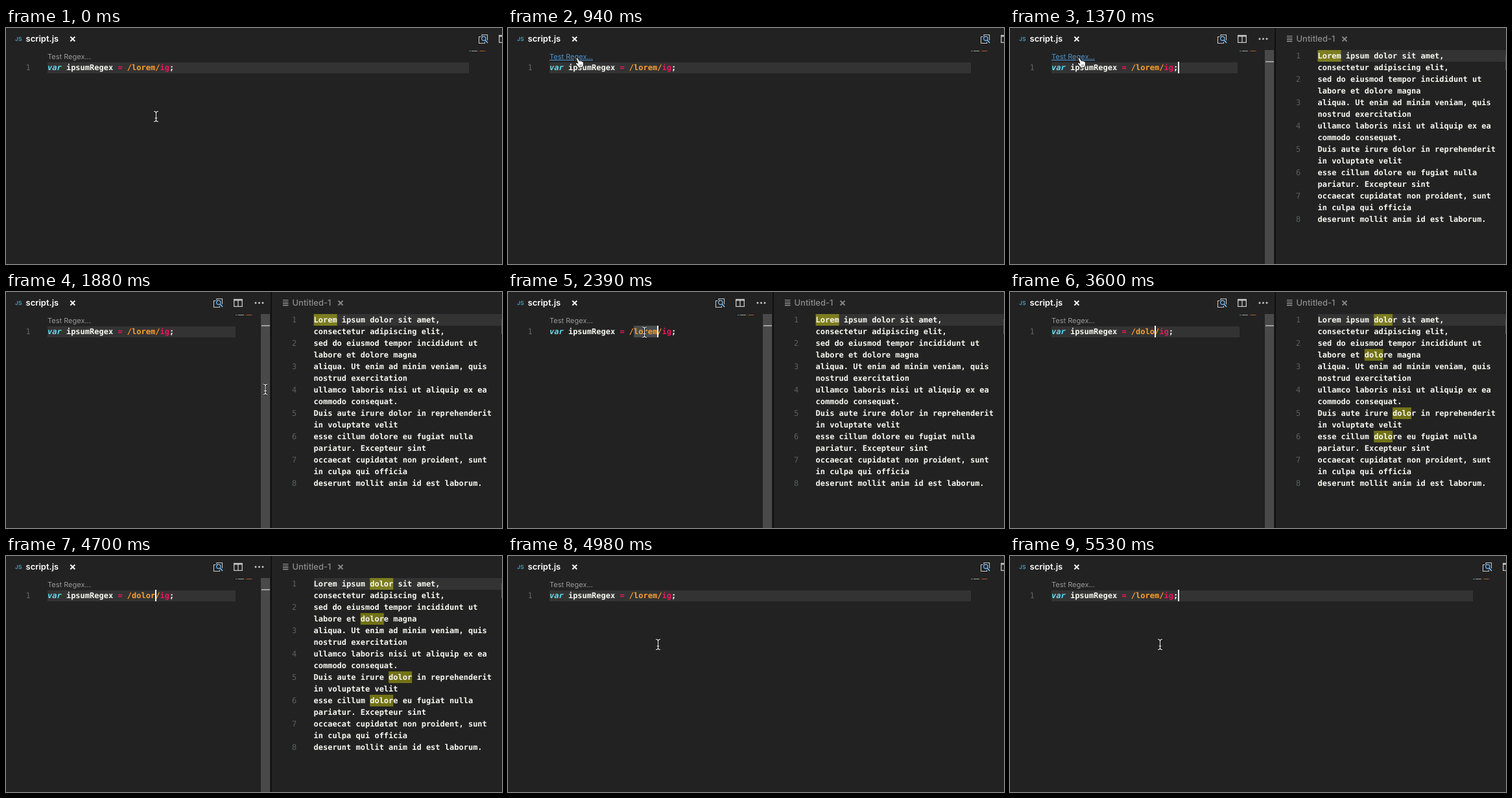
An HTML page that plays this animation: 765 by 364 pixels, repeating every 5650 ms.

```html
<!DOCTYPE html>
<html lang="en">
<head>
<meta charset="utf-8">
<title>Regex preview</title>
<style>
  html, body { margin: 0; width: 100%; height: 100%; overflow: hidden; background: #222; }
  svg { display: block; }
  text { white-space: pre; font: 500 13px Inter, "Open Sans", sans-serif; text-rendering: geometricPrecision; }
  .mono { font: 12px "DejaVu Sans Mono", monospace; }
  .bold { font-weight: bold; fill: #f8f8f2; }
  .title { font-weight: 600; fill: #fff; }
  .lens { font-size: 11px; font-weight: 400; }
  .badge { font-size: 8.5px; font-weight: 600; fill: #519aba; }
</style>
</head>
<body>
<svg id="stage" width="765" height="364" viewBox="0 0 765 364"></svg>
<script>
const LOOP = 5650, CHAR = 7.224, ROW = 18;
const CODE_X = 64, DOC_X = 474.5;
const PINK = '#f0155f', ORANGE = '#fd9f2b', CYAN = '#66d9ef';
const SPLIT = 1370, CLOSE = 4980, SELECT = 2270, TYPE = 3090;

const rows = [
  'Lorem ipsum dolor sit amet,', 'consectetur adipiscing elit,',
  'sed do eiusmod tempor incididunt ut', 'labore et dolore magna',
  'aliqua. Ut enim ad minim veniam, quis', 'nostrud exercitation',
  'ullamco laboris nisi ut aliquip ex ea', 'commodo consequat.',
  'Duis aute irure dolor in reprehenderit', 'in voluptate velit',
  'esse cillum dolore eu fugiat nulla', 'pariatur. Excepteur sint',
  'occaecat cupidatat non proident, sunt', 'in culpa qui officia',
  'deserunt mollit anim id est laborum.'
];

// Each track lists [start time, ...values]; values hold until the next entry.
const pattern = [[0, 'lorem'], [TYPE, 'd'], [3330, 'do'], [3480, 'dol'],
  [3600, 'dolo'], [3750, 'dolor'], [CLOSE, 'lorem']];
const matched = pattern.map(([t, word]) => [t === TYPE ? 3210 : t, word]);
const caretOn = [[0, 0], [270, 1], [820, 0], [SPLIT, 1], [1880, 0], [SELECT, 1],
  [2810, 0], [TYPE, 1], [4150, 0], [4700, 1], [CLOSE, 0], [5530, 1]];
const pointer = [[0, 'beam', 231.5, 136.5], [580, 'beam', 214, 122], [700, 'beam', 170, 92],
  [820, 'beam', 128, 62], [940, 'hand', 110, 53], [1490, 'beam', 250, 120],
  [1610, 'beam', 480, 210], [1730, 'beam', 640, 262], [1880, 'beam', 400, 150],
  [2000, 'beam', 210.5, 62], [2660, 'beam', 201, 62.5], [TYPE, ''],
  [CLOSE, 'beam', 231.5, 136.5]];

const at = (track, t) => track.filter(step => step[0] <= t).pop().slice(1);
const rect = (x, y, w, h, fill) =>
  `<rect x="${x}" y="${y}" width="${w}" height="${h}" fill="${fill}"/>`;
const line = (d, color, width = 1) =>
  `<path d="${d}" fill="none" stroke="${color}" stroke-width="${width}"/>`;
const text = (x, y, body, attrs = '') => `<text x="${x}" y="${y}" ${attrs}>${body}</text>`;
const span = (body, fill, attrs = '') => `<tspan fill="${fill}" ${attrs}>${body}</tspan>`;
const cross = (x, color) =>
  line(`M${x - 3.5} 13.5l7 7m0-7l-7 7`, color, 2);

function toolbar(dx) {
  const dots = [385, 390.5, 396].map(x =>
    `<circle cx="${x}" cy="16.8" r="1.5" fill="#c5c5c5"/>`).join('');
  return `<g transform="translate(${dx})">` +
    line('M325 13V10.5H333.5V19M323.5 13.5H320.5V23.5H329.5V21.5', '#c5c5c5', 1.1) +
    line('M330 18.5L334 23', '#75beff', 1.7) +
    `<circle cx="327.8" cy="16.2" r="3.1" fill="#222" stroke="#75beff" stroke-width="1.2"/>` +
    line('M351.7 11.5H364.3V22.3H351.7ZM358 12V22', '#c5c5c5', 1.3) +
    rect(351, 11, 14, 2.5, '#c5c5c5') + dots + '</g>';
}

function minimap(x) {
  const tick = (dx, w, color) => rect(x + dx, 35, w, 1, color);
  return tick(0, 3, '#4b8791') + tick(4, 9, '#a3a39f') + tick(15, 1, '#9a2450') +
    tick(17, 7, '#a36d2b') + tick(24, 2, '#9a2450');
}

function codeLine(word) {
  return text(CODE_X, 65, span('var', CYAN, 'font-style="italic"') + ' ipsumRegex ' +
    span('=', PINK) + ' ' + span(`/${word}/`, ORANGE) + span('ig', PINK) + ';',
    'class="mono bold"');
}

function preview(word) {
  let out = rect(475, 34, 290, 18, '#333');
  rows.forEach((row, i) => {
    const y = 34 + i * ROW;
    for (const hit of row.matchAll(new RegExp(word, 'ig')))
      out += rect(DOC_X + hit.index * CHAR, y, word.length * CHAR, ROW, 'rgba(255,255,0,.36)');
    out += text(DOC_X, y + 13, row, 'class="mono bold"');
    if (i % 2 === 0) out += text(441, y + 13, i / 2 + 1, 'class="mono" fill="#5c5e60"');
  });
  return out + line('M764.5 42V65', '#555') +
    line('M427 12.5h8.5m-8.5 2.7h8.5m-8.5 2.7h8.5m-8.5 2.7h8.5', '#a0a0a0', 1.1) +
    text(441.5, 21, 'Untitled-1', 'fill="#8c8c8c"') + cross(516, '#858585');
}

function drawPointer([kind, x, y]) {
  if (!kind) return '';
  const beam = 'M-3.5-8Q0-8 0-5V5Q0 8-3.5 8M3.5-8Q0-8 0-5M0 5Q0 8 3.5 8M-2 2.5H2';
  const hand = 'M-5-6Q-3.5-8-2-6L.3-2Q1.6-3.2 2.5-1.8Q3.8-2.6 4.6-1.2Q6.2-1.4 6.4.5V4L4.8 8H-1L-5.5 2Q-6 0-4 .4L-2 1.6Z';
  const shape = kind === 'beam'
    ? line(beam, '#111', 2.6) + line(beam, '#f4f4f4', 1.1)
    : `<path d="${hand}" fill="#fff" stroke="#111"/>` + line('M1 3V6M3 3V6', '#333', .7);
  return `<g transform="translate(${x} ${y})">${shape}</g>`;
}

function scene(t) {
  const split = t >= SPLIT && t < CLOSE;
  const selected = t >= SELECT && t < TYPE;
  const [word] = at(pattern, t), mouse = at(pointer, t);
  const hover = mouse[0] === 'hand';
  const edge = !split ? 714 : t < 1490 ? 351 : 354;
  const column = selected || t >= TYPE && split ? 18 + word.length : 27;

  let out = rect(0, 0, 765, 364, '#222');
  if (selected) out += rect(CODE_X + 18 * CHAR, 52, 5 * CHAR, 18, '#4a4d4f');
  else out += rect(CODE_X, 53, edge - CODE_X, 17, '#333');
  out += text(14, 20, 'JS', 'class="badge"') +
    text(30.5, 21, 'script.js', 'class="title"') + cross(102.8, '#f0f0f0') +
    toolbar(split ? 0 : 409) + minimap(split ? 354 : 714) +
    text(CODE_X, 48, 'Test Regex...', `class="lens" fill="${hover ? '#4e94ce' : '#999'}"` +
      (hover ? ' text-decoration="underline"' : '')) +
    text(30.5, 65, '1', 'class="mono" fill="#666"') + codeLine(word);
  if (split) {
    out += rect(393, 34, 14, 330, '#494949') + rect(394, 51, 13, 2, '#a0a0a0') +
      rect(408, 0, 2, 364, '#101010') + preview(at(matched, t)[0]);
  }
  if (at(caretOn, t)[0]) out += rect(Math.round(CODE_X + column * CHAR), 52, 2, 18, '#f8f8f0');
  return out + drawPointer(mouse);
}

const stage = document.getElementById('stage');
let shown = '';
function tick() {
  const next = scene(performance.now() % LOOP);
  if (next !== shown) stage.innerHTML = shown = next;
  requestAnimationFrame(tick);
}
tick();
</script>
</body>
</html>
```
